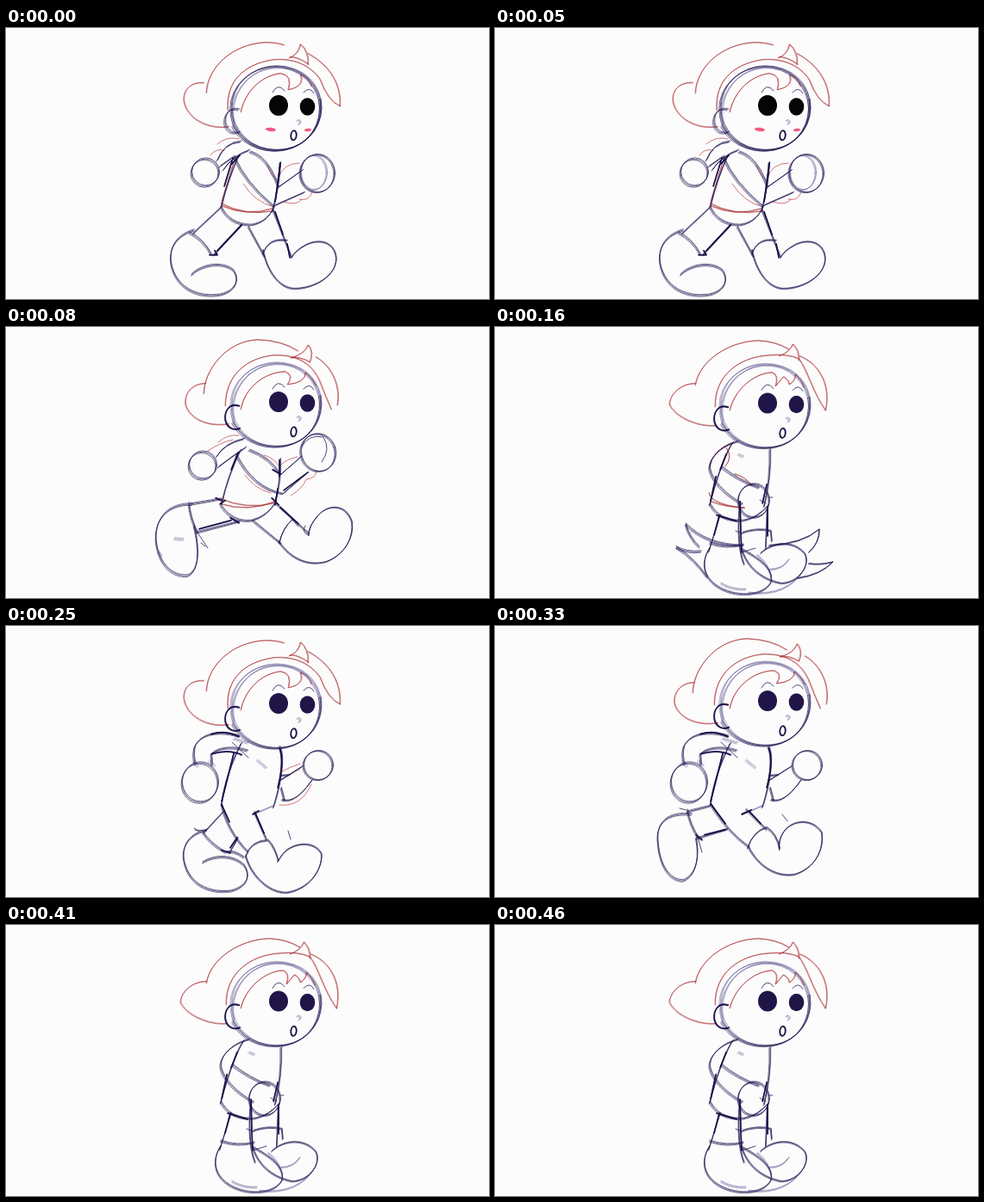
Animation, 560 px wide and 315 px high, one loop 500 ms. Source, as an HTML page with a canvas:

```html
<!DOCTYPE html>
<html lang="en">
<head>
<meta charset="utf-8">
<title>Run cycle sketch</title>
<style>
html, body { margin: 0; width: 100%; height: 100%; overflow: hidden; background: #fcfcfc; }
canvas { display: block; width: 560px; height: 315px; }
</style>
</head>
<body>
<canvas id="stage" width="560" height="315"></canvas>
<script>
const ctx = document.getElementById('stage').getContext('2d');

// pencil: colour, width, passes, spread, opacity
const pens = {
  ink: ['#251a55', 0.95, 3, 1, 0.7],
  soft: ['#4d4585', 0.8, 3, 1, 0.5],
  dark: ['#170c46', 1.5, 2, 0.5, 0.85],
  thin: ['#251a55', 1, 1, 0, 0.8],
  red: ['#a8282e', 0.9, 2, 0.6, 0.65],
  rose: ['#c04a50', 1, 1, 0, 0.75]
};

// each shape is redrawn with slight shifts, like overlapping pencil lines
function draw(pen, path) {
  const [color, width, passes, spread, alpha] = pens[pen];
  const shape = path instanceof Path2D ? path : new Path2D(path);
  ctx.strokeStyle = color;
  ctx.lineWidth = width;
  ctx.globalAlpha = alpha;
  for (let i = 0; i < passes; i++) {
    ctx.save();
    ctx.translate(300 + spread * Math.sin(i * 2.4), 160 + spread * Math.sin(i * 4.1));
    ctx.rotate(0.006 * spread * Math.sin(i * 2));
    ctx.translate(-300, -160);
    ctx.stroke(shape);
    ctx.restore();
  }
  ctx.globalAlpha = 1;
}

function oval(x, y, rx, ry, tilt = 0) {
  const p = new Path2D();
  p.ellipse(x, y, rx, ry, tilt, 0, Math.PI * 2);
  return p;
}

function dot(color, ...box) {
  ctx.fillStyle = color;
  ctx.fill(oval(...box));
}

const sketch = parts => parts.forEach(([pen, path]) => draw(pen, path));

const hair = {
  wide: [
    ['red', 'M232 76C233 46 262 19 300 17Q314 17 322 20'],
    ['red', 'M229 64C213 63 205 73 206 85C209 105 233 119 258 115'],
    ['red', 'M328 35Q339 31 341 19Q351 27 350 43M329 34Q337 33 350 42M350 30C369 40 389 60 387 91'],
    ['red', 'M257 96C254 62 276 42 310 37C334 35 353 44 364 60Q373 85 387 91'],
    ['red', 'M272 98C276 77 293 56 318 53Q332 55 327 72Q347 68 341 54Q351 57 354 68']
  ],
  high: [
    ['red', 'M229 78C229 51 255 16 292 15Q320 16 338 28'],
    ['red', 'M231 66C215 66 206 78 208 91C213 108 235 117 258 113'],
    ['red', 'M330 36Q346 32 350 21Q357 29 352 41M331 36Q340 34 352 41M359 35C378 46 388 69 384 91'],
    ['red', 'M254 92C254 55 280 36 310 33C340 32 355 45 363 62Q370 80 377 96'],
    ['red', 'M272 96C276 72 298 53 323 52Q334 56 326 67Q347 65 347 53Q355 59 359 68']
  ],
  long: [
    ['red', 'M232 68C236 40 270 17 305 16Q326 17 340 26'],
    ['red', 'M232 66C215 66 203 78 202 90C208 105 235 117 256 115'],
    ['red', 'M329 34Q342 29 345 20Q353 28 352 39M353 34C374 42 390 66 383 97'],
    ['red', 'M255 93C254 56 283 35 318 33Q338 31 352 37C363 52 367 74 383 97'],
    ['red', 'M272 97C277 74 299 54 321 53Q329 56 325 69L334 58Q340 61 341 67Q348 63 348 55Q355 61 358 70']
  ]
};

function head(style, y, bold) {
  sketch(hair[style]);
  ctx.save();
  ctx.translate(0, y);
  draw(bold ? 'ink' : 'soft', oval(313, 93.5, 52, 49));
  draw('soft', 'M264 113C257 78 281 46 316 46C343 46 360 62 364 84');
  draw('ink', 'M364 83C369 112 350 142 313 142C290 142 272 131 263 114');
  draw(bold ? 'ink' : 'dark', 'M270 95C258 91 253 102 254 111C256 121 264 124 271 121');
  draw('thin', 'M309 75Q315 63 323 73M345 75Q352 67 357 76');
  draw('soft', 'M338 107Q344 108 340 112');
  const eye = bold ? '#050406' : '#211548';
  dot(eye, 316, 90, 11, 12);
  dot(eye, 349.5, 91.5, 8.8, 10.2);
  draw('dark', oval(333.3, 125, 3.2, 5.6, 0.1));
  if (bold) {
    dot('#f05a80', 307, 118, 6, 2.2, 0.1);
    dot('#f05a80', 350, 118.5, 4, 1.8, -0.1);
  }
  ctx.restore();
}

const pelvis = 'M249 207C255 222 268 229 284 229C298 227 306 219 311 208';

// upper body with the rear arm bent and the near fist raised
const swing = [
  ['ink', 'M273 136C261 160 253 184 250 208M317 140C324 151 318 188 310 211'],
  ['ink', 'M270 128C248 121 226 125 219 140Q216 152 220 161M280 145C262 139 245 142 238 149L239 162'],
  ['dark', 'M238 126Q253 121 270 129M238 149Q258 143 273 150M264 148L250 204M317 142Q323 157 315 188'],
  ['thin', 'M262 135L281 153'],
  ['soft', 'M264 131L281 136M291 156L302 165M287 219L310 209M217 157L223 164M235 157L242 163'],
  ['ink', oval(225, 182, 21, 23)],
  ['ink', oval(362, 162, 17, 17)],
  ['ink', 'M317 180L344 163M320 202Q335 208 355 179M318 174L329 173M319 188L323 203']
];

// passing pose, both legs under the body
const pass = [
  ['ink', 'M282 133C262 138 248 152 249 165C252 181 270 197 287 206M263 163Q281 178 306 187'],
  ['ink', 'M276 134C265 150 254 187 249 207M319 142Q320 176 312 209'],
  ['dark', 'M268 148L261 166M256 174L250 202M315 183L310 205'],
  ['ink', oval(300, 202, 18, 19.5)],
  ['ink', 'M249 205C256 220 270 226 288 225Q305 222 317 207'],
  ['ink', 'M261 219L248 261M284 206C281 236 283 262 289 276M316 210L314 257'],
  ['dark', 'M260 219L254 242M284 203L285 242L286 262M316 209L316 243M257 219L280 226'],
  ['thin', 'M286 262L302 257M307 201L314 205M318 198L322 198M279 237L287 240'],
  ['ink', 'M287 239Q305 233 320 237L321 249M249 251Q267 258 288 253'],
  ['ink', 'M249 257C239 272 241 290 257 301C277 315 311 314 320 297C324 281 306 269 286 258'],
  ['ink', 'M286 258C293 281 311 294 332 298C352 298 367 276 359 263C346 248 323 249 308 263'],
  ['soft', 'M262 298Q275 306 291 305M294 309Q340 314 359 281M304 265Q319 276 321 294M318 282Q334 282 341 270M282 148L288 151']
];

const poses = [
  { // stride, front heel down
    hold: 80, head: ['wide', 0, true],
    body: [
      ['red', 'M249 204Q276 219 310 213M250 207Q279 220 309 210M266 149L250 202'],
      ['rose', 'M237 148Q242 140 253 142M245 135Q256 125 270 129M303 160Q308 174 315 176Q321 157 340 157M275 181Q289 203 311 208M322 202Q338 207 343 199M340 199Q351 202 355 191'],
      ['ink', 'M245 154Q253 133 272 132M252 165Q262 149 282 142M262 151L248 161'],
      ['ink', 'M270 148Q257 177 250 207M318 156Q317 184 309 213'],
      ['ink', oval(231, 168, 16, 16)],
      ['ink', 'M264 149Q277 180 310 207L346 191M283 144C300 149 309 166 316 185L344 165'],
      ['dark', 'M263 151L253 184M318 157L312 202M271 148L262 158'],
      ['ink', oval(361, 169, 20, 22)],
      ['soft', oval(357, 168, 15, 20)],
      ['ink', pelvis],
      ['ink', 'M250 208L217 239M274 229L241 264M281 231L300 266M310 212L331 266'],
      ['dark', 'M273 229L245 259M312 214L321 240M236 264L245 264L242 259M326 251L329 267'],
      ['ink', 'M213 238Q229 246 238 263M298 263Q304 243 326 247'],
      ['ink', 'M218 235C194 242 187 261 193 280C201 305 225 314 249 310C269 305 271 290 263 281C251 272 228 274 215 287'],
      ['ink', 'M298 258C303 282 316 302 334 303C358 303 383 288 383 268C382 249 364 244 348 252Q335 259 331 267']
    ]
  },
  { // long stride
    hold: 80, head: ['high', -3],
    body: [
      ['red', 'M249 200Q278 213 311 205M249 206Q281 216 312 203'],
      ['rose', 'M234 144Q249 134 263 131M246 134Q257 124 270 126M299 149Q309 151 317 162Q325 153 338 151M277 172Q288 188 307 193M330 196Q344 188 348 177Q360 176 360 167'],
      ['ink', 'M244 151Q253 135 276 130M246 163Q260 152 278 140'],
      ['ink', 'M272 143Q257 174 250 206M318 153Q319 181 312 204'],
      ['ink', oval(228, 161, 16, 16)],
      ['ink', 'M267 149Q287 188 321 194L349 170M282 143Q307 152 318 172L342 151'],
      ['dark', 'M269 146L261 166M317 155L317 174M309 166L318 171M322 190L350 169M315 188L312 207M243 199L250 202M308 199L316 207'],
      ['ink', oval(362, 146, 20, 22, -0.3)],
      ['thin', 'M343 139Q351 124 368 128Q377 142 366 157'],
      ['ink', 'M249 207C257 220 269 227 285 225Q303 220 312 205'],
      ['ink', 'M249 200L214 206M271 226L221 239M286 225L319 252M313 205L351 240'],
      ['dark', 'M261 225L224 235M318 210L339 229M248 206L254 202M260 222L270 228'],
      ['thin', 'M220 236L234 257M226 251L231 255M331 223L339 232'],
      ['ink', 'M212 205Q214 224 222 239M317 251Q321 233 332 224'],
      ['ink', 'M216 206C187 205 172 224 174 249C177 277 194 291 211 289C224 283 225 260 218 231'],
      ['ink', 'M316 249C331 271 351 278 371 273C393 265 404 244 401 226C394 205 373 206 362 219Q351 231 351 242'],
      ['thin', 'M351 242Q342 239 347 231'],
      ['soft', 'M195 246L206 247M177 261L181 267']
    ]
  },
  { // passing, with flicks at the feet
    hold: 90, head: ['long', -1.5],
    body: [
      ['red', 'M248 193Q249 206 289 211M250 203Q267 210 289 210'],
      ['red', 'M274 135Q252 143 248 165M268 141Q276 151 267 162M278 171Q291 175 298 185'],
      ...pass,
      ['ink', 'M288 254Q245 254 221 229Q225 245 237 256M239 261Q223 263 210 256Q231 269 246 291'],
      ['ink', 'M318 254Q357 252 376 235Q377 250 364 262M364 275Q378 277 392 273Q378 288 351 292']
    ]
  },
  { // stride on the other leg
    hold: 80, head: ['wide', 0],
    body: [
      ['rose', 'M318 170Q329 164 341 160M317 208Q342 211 354 184M319 179L341 166'],
      ...swing,
      ['ink', 'M250 207C253 224 264 247 281 263M288 216L302 248M252 216L229 241M269 247L259 264'],
      ['dark', 'M289 218L299 241M250 208L259 228M268 246L260 258M286 219L293 215M250 261L260 264'],
      ['ink', 'M228 239Q235 252 254 263Q264 260 276 269M278 268Q283 250 304 249Q312 257 316 273'],
      ['ink', 'M233 237C208 243 202 261 208 279C216 304 240 311 261 308C281 303 284 289 276 278C263 266 242 266 228 275'],
      ['ink', 'M278 267C284 290 304 310 325 310C350 307 367 285 366 265C358 249 333 251 321 265L315 274'],
      ['thin', 'M327 238L330 248M219 237L232 238M218 235L224 239']
    ]
  },
  { // long stride on the other leg
    hold: 80, head: ['high', -3],
    body: [
      ...swing,
      ['ink', 'M250 207C262 227 278 246 295 257M291 213L315 237M250 209L223 216M270 236L234 247'],
      ['dark', 'M250 207L267 230M294 215L308 230M267 237L243 243M286 219L297 214M233 243L240 249'],
      ['ink', 'M223 214Q226 232 237 248M293 258Q299 239 315 234Q327 242 330 258'],
      ['ink', 'M228 219C200 216 186 229 189 252C191 278 202 296 218 296C233 291 238 269 233 246'],
      ['ink', 'M294 257C306 280 326 292 347 289C371 282 382 260 379 240C368 223 345 225 335 239Q328 249 330 260'],
      ['thin', 'M333 219L339 227M236 249L240 263M214 212L222 214']
    ]
  },
  { // passing
    hold: 90, head: ['long', -1.5],
    body: pass
  }
];

function poseAt(t) {
  for (const pose of poses) {
    if (t < pose.hold) return pose;
    t -= pose.hold;
  }
}

const loop = poses.reduce((sum, p) => sum + p.hold, 0);
let shown;
ctx.lineCap = ctx.lineJoin = 'round';

function frame() {
  const pose = poseAt(performance.now() % loop);
  if (pose !== shown) {
    shown = pose;
    ctx.fillStyle = '#fcfcfc';
    ctx.fillRect(0, 0, 560, 315);
    sketch(pose.body);
    head(...pose.head);
  }
  requestAnimationFrame(frame);
}
frame();
</script>
</body>
</html>
```
